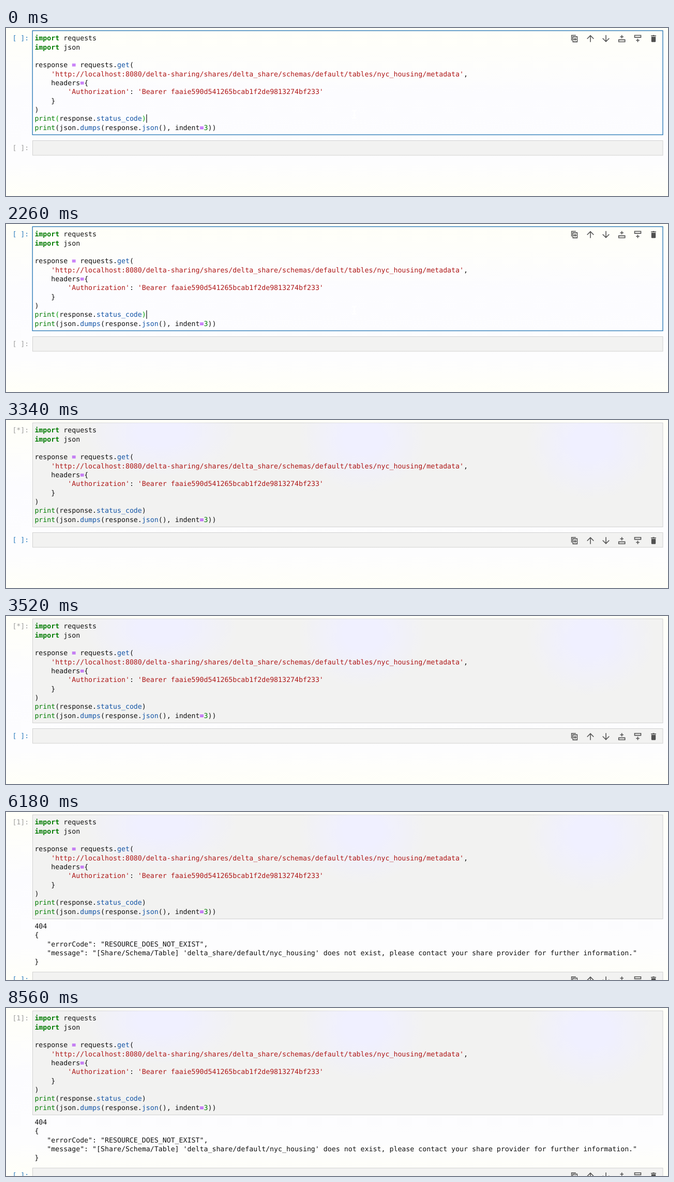
An HTML page for the animation above (8580 ms loop, 1280 by 326 pixels).

```html
<!DOCTYPE html>
<html lang="en">
<head>
<meta charset="utf-8">
<title>Notebook cell run</title>
<style>
  html, body { margin: 0; width: 100%; height: 100%; overflow: hidden; background: #fdfdfc; }
  svg { display: block; width: 1280px; height: 326px; }
  text { font: 13.268px "DejaVu Sans Mono", monospace; white-space: pre; fill: #111; text-rendering: geometricPrecision; }
  .keyword { fill: #007b00; font-weight: bold; }
  .builtin, .number { fill: #007b00; }
  .string { fill: #ae1717; }
  .property { fill: #1455a6; }
  .operator { fill: #a020f5; font-weight: bold; }
  .focused .bracket { fill: #00a000; }
  .prompt { fill: #9c9c9c; }
  .prompt.active { fill: #2b7cbd; }
  .idle { fill: #f2f2f1; stroke: #d2d2d2; }
  .line { fill: none; stroke: #555; stroke-width: 1.6; }
  .solid { fill: #505050; }
</style>
</head>
<body>
<svg viewBox="0 0 1280 326" xmlns="http://www.w3.org/2000/svg">
  <defs>
    <linearGradient id="page" x2="0" y2="1">
      <stop offset="0" stop-color="#fffff8"/>
      <stop offset=".4" stop-color="#fcfcff"/>
      <stop offset=".8" stop-color="#fdfdfe"/>
      <stop offset="1" stop-color="#fffff8"/>
    </linearGradient>
    <radialGradient id="tint">
      <stop offset=".3" stop-color="#f0f0ff"/>
      <stop offset="1" stop-color="#f0f0ff" stop-opacity="0"/>
    </radialGradient>
    <clipPath id="cell"><rect x="51.5" y="5.5" width="1218" height="201.5"/></clipPath>
  </defs>

  <rect width="1280" height="326" fill="url(#page)"/>

  <g id="idleCell">
    <rect class="idle" x="51.5" y="5.5" width="1218.5" height="202"/>
    <g clip-path="url(#cell)" fill="url(#tint)">
      <ellipse cx="300" cy="25" rx="150" ry="85"/>
      <ellipse cx="690" cy="35" rx="125" ry="105"/>
      <ellipse cx="1130" cy="45" rx="125" ry="110"/>
    </g>
  </g>
  <rect id="focusCell" x="51.2" y="5.2" width="1218.8" height="202" fill="none" stroke="#2f7db9" stroke-width="1.4"/>

  <text id="prompt" class="prompt" x="12.4" y="24.2"></text>
  <g id="code"></g>
  <g id="output"></g>
  <rect id="caret" x="271.3" y="167.5" width="1.2" height="16.5" fill="#111"/>

  <g id="nextCell">
    <rect class="idle" x="51.5" y="218.5" width="1218.5" height="28.5"/>
    <text id="nextPrompt" class="prompt" x="12.4" y="237.3">[ ]:</text>
  </g>

  <g id="toolbar">
    <g transform="translate(1099 20.5)">
      <path class="line" stroke-width="1.4" d="M-5.4 3.8V-6.2H2.8M-2.8-3.6H5.4V6.4H-2.8ZM1.3-1.5V4.3M-1.6 1.4H4.2"/>
    </g>
    <path class="line" transform="translate(1130 20.5)" d="M0 6.8V-5.6M-6.3.5L0-5.8L6.3.5"/>
    <path class="line" transform="translate(1160 20.5)" d="M0-6.8V5.6M-6.3-.5L0 5.8L6.3-.5"/>
    <path class="line" transform="translate(1190.7 20.5)" d="M0-6.8V-.2M-3.3-3.5H3.3M-6 2.4H6V6.2H-6Z"/>
    <path class="line" transform="translate(1221.5 20.5)" d="M0 6.8V.2M-3.3 3.5H3.3M-6-2.4H6V-6.2H-6Z"/>
    <path class="solid" transform="translate(1252 20.5)" d="M-5-6H-2.2L-1.4-6.8H1.4L2.2-6H5V-4.4H-5ZM-4.2-3.4H4.2V5.2Q4.2 6.7 2.7 6.7H-2.7Q-4.2 6.7-4.2 5.2Z"/>
  </g>

  <g id="pointer" fill="none" stroke-linecap="round">
    <path id="beam" stroke="#fff" stroke-width="3" d="M670.7 160Q673.5 160 673.5 162.5Q673.5 160 676.3 160M673.5 162V172.5M670.7 174.5Q673.5 174.5 673.5 172Q673.5 174.5 676.3 174.5M672 169H675"/>
    <use href="#beam"/>
  </g>
  <rect id="scrollbar" x="1276.5" y="314" width="6" height="16" rx="3" fill="#777"/>
</svg>

<script>
const LOOP = 8580, HIDE_POINTER = 2800, RUN = 3340, DONE = 3660;
const FADE_START = 5040, FADE_END = 5280;
const LINE = 17.35, LEFT = 55.4;

const source = `import requests
import json

response = requests.get(
    'http://localhost:8080/delta-sharing/shares/delta_share/schemas/default/tables/nyc_housing/metadata',
    headers={
        'Authorization': 'Bearer faaie590d541265bcab1f2de9813274bf233'
    }
)
print(response.status_code)
print(json.dumps(response.json(), indent=3))`;

const result = `404
{
   "errorCode": "RESOURCE_DOES_NOT_EXIST",
   "message": "[Share/Schema/Table] 'delta_share/default/nyc_housing' does not exist, please contact your share provider for further information."
}`;

const MATCHED_LINE = 9;
const tokens = /(?<string>'[^']*')|(?<keyword>\bimport\b)|(?<builtin>\bprint\b)|(?<property>(?<=\.)\w+)|(?<operator>=)|(?<number>\b\d+\b)|(?<bracket>[()])/g;

const $ = id => document.getElementById(id);
const show = (id, on) => { $(id).style.display = on ? "" : "none"; };

function highlight(line, row) {
  return line.replace(tokens, (...args) => {
    const [kind, word] = Object.entries(args.at(-1)).find(([, v]) => v !== undefined);
    if (kind === "bracket" && row !== MATCHED_LINE) return word;
    return `<tspan class="${kind}">${word}</tspan>`;
  });
}

function writeLines(id, text, top, format = s => s) {
  $(id).innerHTML = text.split("\n").map((line, row) =>
    `<text x="${LEFT}" y="${(top + row * LINE).toFixed(2)}">${format(line, row)}</text>`).join("");
}

writeLines("code", source, 24.2, highlight);
writeLines("output", result, 226);

function render(t) {
  const ran = t >= RUN, done = t >= DONE;
  const shift = done ? 92 : 0;
  show("idleCell", ran);
  show("focusCell", !ran);
  show("caret", !ran);
  show("output", done);
  show("pointer", t < HIDE_POINTER);
  $("code").classList.toggle("focused", !ran);
  $("prompt").textContent = done ? "[1]:" : ran ? "[*]:" : "[ ]:";
  $("prompt").classList.toggle("active", !ran);
  $("nextPrompt").classList.toggle("active", ran);
  $("nextCell").setAttribute("transform", `translate(0 ${shift})`);
  $("toolbar").setAttribute("transform", `translate(0 ${ran ? 213.5 + shift : 0})`);
  const fade = (FADE_END - t) / (FADE_END - FADE_START);
  $("scrollbar").style.opacity = done ? Math.min(1, Math.max(0, fade)) : 0;
}

const start = performance.now();
function tick() {
  render((performance.now() - start) % LOOP);
  requestAnimationFrame(tick);
}
tick();
</script>
</body>
</html>
```
